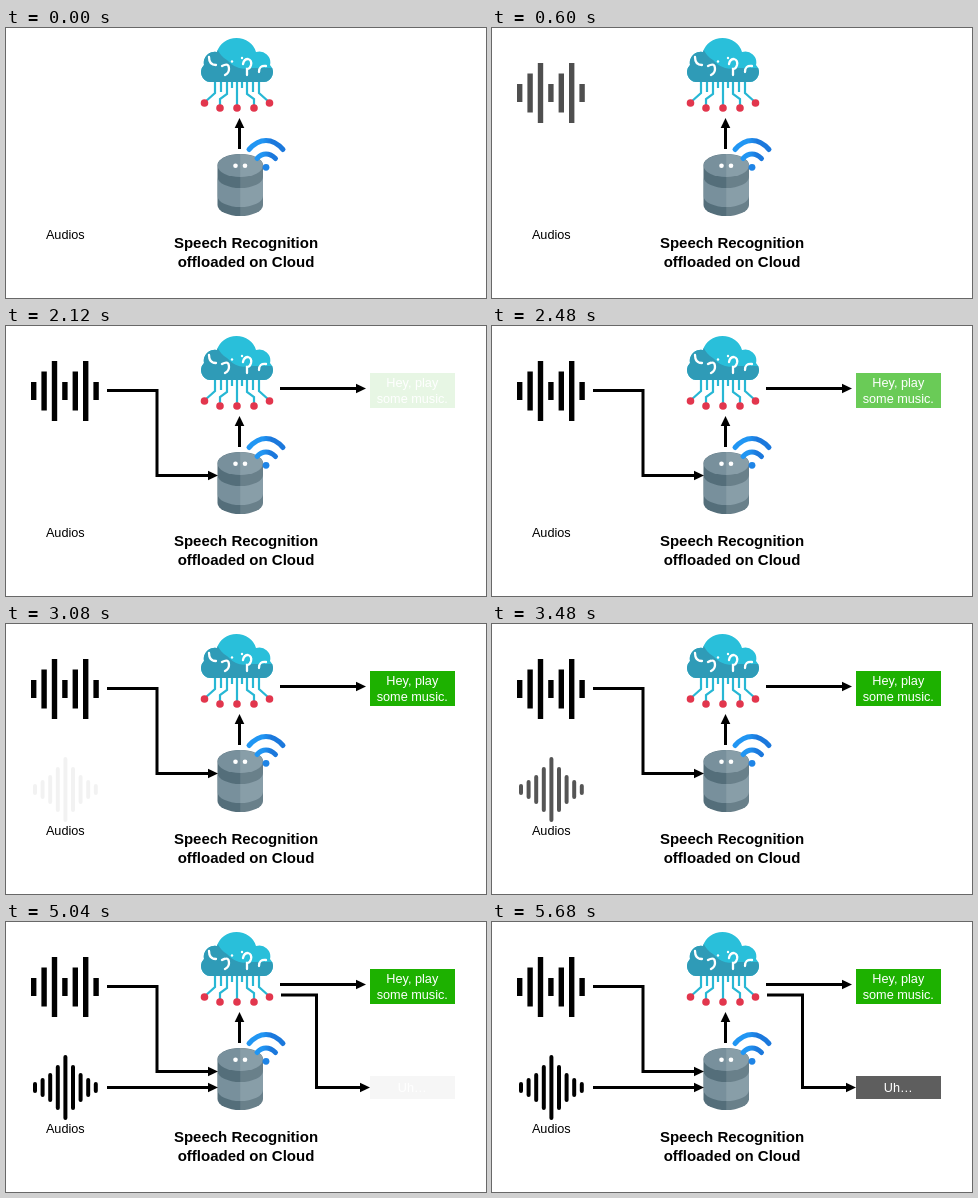
Recreate the animation shown at these times as an HTML page. Size 480 by 270 pixels, loop 5.8 s.

```html
<!DOCTYPE html>
<html>
<head>
<meta charset="utf-8">
<style>
html, body { margin: 0; width: 100%; height: 100%; overflow: hidden; background: #fff; }
svg { display: block; width: 480px; height: 270px; font: 12.7px "Liberation Sans", Arial, sans-serif; }
text { text-anchor: middle; }
.title { font-size: 15px; font-weight: bold; }
.line { fill: none; stroke: #000; stroke-width: 3; }
.box text { fill: #fff; }
</style>
</head>
<body>
<svg viewBox="0 0 480 270">
  <defs>
    <linearGradient id="blue">
      <stop offset=".4" stop-color="#2196f3"/><stop offset=".65" stop-color="#1b78dc"/>
    </linearGradient>
    <clipPath id="cloudShape">
      <path d="M204 54a10 10 0 0 1-6-17a11 11 0 0 1 13-13a20 18 0 0 1 39 0a11 11 0 0 1 14 13a10 10 0 0 1-6 17z"/>
    </clipPath>
    <clipPath id="can">
      <path d="M211.5 137a22.75 11 0 0 1 45.5 0V177a22.75 11 0 0 1-45.5 0z"/>
    </clipPath>
  </defs>

  <!-- cloud -->
  <g id="wires" fill="none" stroke="#27b7d4" stroke-width="2.2"></g>
  <g id="nodes" fill="#e2364d"></g>
  <g clip-path="url(#cloudShape)">
    <rect x="190" y="10" width="80" height="46" fill="#29bfda"/>
    <path d="M190 20H211Q214 28 221 32Q231 43 242 40H270V56H190z" fill="#2f9bb7"/>
  </g>
  <g fill="none" stroke="#fff" stroke-width="2.3" stroke-linecap="round">
    <path d="M203 29q0 8 7 8M216 38q7-4 7 3q0 4-4 6M237 36q1-5 5-5q4 1 3 6q-1 4-4 4v6M260 38q-7-1-7 6"/>
  </g>
  <g fill="#fff"><circle cx="226" cy="33.5" r="1.2"/><circle cx="236" cy="30" r="1.2"/></g>

  <!-- speaker -->
  <g clip-path="url(#can)">
    <rect x="211" y="125" width="47" height="64" fill="#546e7a"/>
    <path d="M211.5 149a22.75 11 0 0 0 45.5 0v19a22.75 11 0 0 1-45.5 0z" fill="#78909c"/>
    <ellipse cx="234.25" cy="137.5" rx="22.75" ry="11.5" fill="#78909c"/>
    <path d="M234.25 125h23v64h-23z" fill="#fff" opacity=".12"/>
  </g>
  <g fill="#fff"><circle cx="229.5" cy="137.7" r="2.3"/><circle cx="239" cy="137.7" r="2.3"/></g>
  <g fill="none" stroke="url(#blue)" stroke-width="5" stroke-linecap="round">
    <path d="M243 121.5Q251 112.5 260 112.5T277 121.5M251 130.5Q255 126 260 126T269.500 130.500"/>
  </g>
  <circle cx="260" cy="139.3" r="3.4" fill="#1e84e6"/>

  <path class="line" d="M233.5 121V98"/>
  <path d="M233.500 90l-4.800 10h9.600z"/>
  <text x="59.3" y="211">Audios</text>
  <g class="title">
    <text x="240" y="220">Speech Recognition</text>
    <text x="240" y="239">offloaded on Cloud</text>
  </g>

  <g id="wave1"></g>
  <g id="wave2"></g>
  <g id="reply1" class="box">
    <rect x="364" y="47" width="85" height="35" fill="#1db100"/>
    <text x="406.3" y="61">Hey, play</text>
    <text x="406.3" y="77">some music.</text>
  </g>
  <g id="reply2" class="box">
    <rect x="364" y="154" width="85" height="23" fill="#5e5e5e"/>
    <text x="406.3" y="170">Uh…</text>
  </g>
  <g id="arrows"></g>
</svg>
<script>
const LOOP = 5800, STEP = 40, FADE = 650, HEAD = 10;
const $ = id => document.getElementById(id);

function add(parent, tag, attrs) {
  const el = document.createElementNS('http://www.w3.org/2000/svg', tag);
  for (const k in attrs) el.setAttribute(k, attrs[k]);
  return parent.appendChild(el);
}

function bars(id, heights, x, pitch, width, mid, rx) {
  heights.forEach((h, i) => add($(id), 'rect',
    { x: x + i * pitch, y: mid - h / 2, width, height: h, rx }));
}
bars('wave1', [18, 39, 60, 18, 39, 60, 18], 25, 10.4, 5.4, 65, 0);
bars('wave2', [11, 19, 29, 45, 65, 45, 29, 19, 11], 27, 7.6, 4, 165.5, 2);

// circuit below the cloud, symmetric about x = 231
for (const s of [-1, 1]) {
  const x = d => 231 + s * d;
  add($('wires'), 'path', {
    d: `M${x(22)} 53V65L${x(32)} 74M${x(10)} 53V66L${x(17)} 71V79M${x(16)} 53V64M${x(5)} 53V60`
  });
  add($('nodes'), 'circle', { cx: x(32.5), cy: 75, r: 3.8 });
  add($('nodes'), 'circle', { cx: x(17), cy: 80, r: 3.8 });
}
add($('wires'), 'path', { d: 'M231 53V79' });
add($('nodes'), 'circle', { cx: 231, cy: 80, r: 3.8 });

const fades = [['wave1', 155], ['reply1', 2055], ['wave2', 3050], ['reply2', 5010]]
  .map(([id, start]) => ({ el: $(id), start }));

const arrows = [
  ['M101 64.5H151V149.5H212', 965, 500],
  ['M274 62.500H360', 1465, 455],
  ['M101 165.500H212', 3860, 500],
  ['M275 73H310.500V165.500H364', 4360, 455]
].map(([d, start, time]) => {
  const g = add($('arrows'), 'g', {});
  const line = add(g, 'path', { d, class: 'line' });
  const head = add(g, 'path', { d: `M0 0L${-HEAD} -4.8V4.8z` });
  return { g, line, head, start, time, len: line.getTotalLength() };
});

const progress = (t, start, time) => Math.min(1, Math.max(0, (t - start) / time));

function drawArrow(a, t) {
  const p = progress(t, a.start, a.time), l = p * a.len;
  a.g.style.display = p > 0 ? '' : 'none';
  if (!p) return;
  const tip = a.line.getPointAtLength(l);
  const back = a.line.getPointAtLength(Math.max(0, l - 0.5));
  const angle = Math.atan2(tip.y - back.y, tip.x - back.x) * 180 / Math.PI;
  a.line.setAttribute('stroke-dasharray', `${Math.max(0, l - HEAD + 2)} 999`);
  a.head.setAttribute('transform', `translate(${tip.x} ${tip.y}) rotate(${angle})`);
}

function draw(now) {
  const t = Math.floor(now % LOOP / STEP) * STEP;
  for (const f of fades) f.el.setAttribute('opacity', progress(t, f.start, FADE));
  for (const a of arrows) drawArrow(a, t);
}

let begin;
function tick(now) {
  begin ??= now;
  draw(now - begin);
  requestAnimationFrame(tick);
}
draw(0);
requestAnimationFrame(tick);
</script>
</body>
</html>
```
